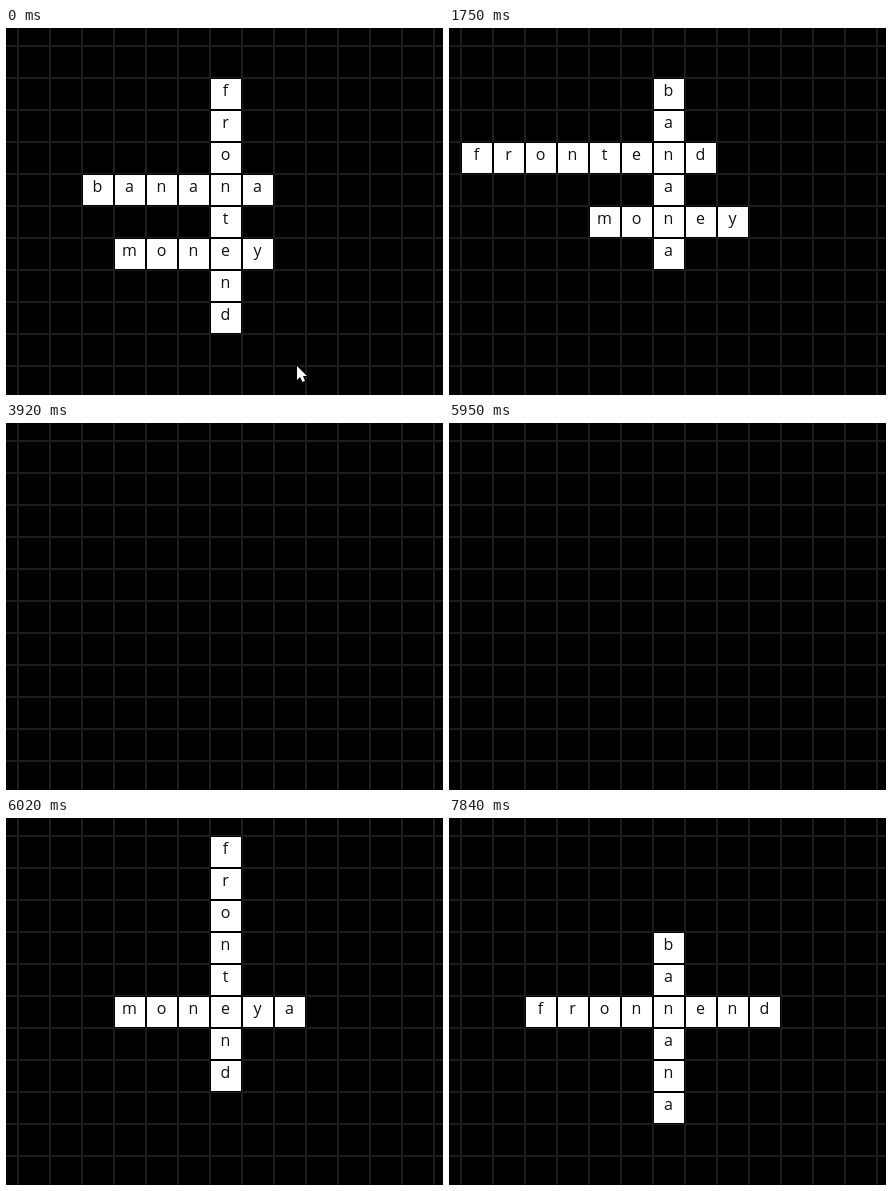
An HTML page for the animation above (8 s loop, 437 px wide and 367 px high).

```html
<!DOCTYPE html>
<html lang="en">
<head>
<meta charset="utf-8">
<title>Crossword layouts</title>
<style>
  html, body { margin: 0; width: 100%; height: 100%; overflow: hidden; background: #000; }
  svg { display: block; }
  text { font: 16px "Open Sans", "Noto Sans", sans-serif; text-anchor: middle; fill: #111; }
  .layout, #cursor { visibility: hidden; }
</style>
</head>
<body>
<svg id="stage" width="437" height="367" viewBox="0 0 437 367">
  <path id="grid" stroke="#1c1c1c" stroke-width="2" fill="none"/>
  <g id="layouts"></g>
  <path id="cursor" d="M291 338V352L294 349L296.5 354L299 353L297 348H301Z"
        fill="#fff" stroke="#000" stroke-width="2" paint-order="stroke"/>
</svg>
<script>
const CELL = 32, LEFT = 12, TOP = 18, LOOP = 8000;

// Each word: text, column, row, runs downward?
const LAYOUTS = {
  tall: [['frontend', 6, 1, true], ['banana', 2, 4], ['money', 3, 6]],
  wide: [['banana', 6, 1, true], ['frontend', 0, 3], ['money', 4, 5]],
  cross: [['frontend', 6, 0, true], ['moneya', 3, 5]],
  low: [['banana', 6, 3, true], ['fronnend', 2, 5]]
};

// Start time in ms and the layout shown from then on; null leaves the grid empty.
const STEPS = [
  [0, 'tall'], [1680, null], [1750, 'wide'], [3920, null], [3990, 'tall'],
  [5950, null], [6020, 'cross'], [7770, null], [7840, 'low']
];
const CURSOR_END = 70;

function add(parent, tag, attrs, content = '') {
  const node = document.createElementNS('http://www.w3.org/2000/svg', tag);
  for (const [key, value] of Object.entries(attrs)) node.setAttribute(key, value);
  node.textContent = content;
  return parent.appendChild(node);
}

function drawCell(parent, letter, column, row) {
  const x = LEFT + column * CELL, y = TOP + row * CELL;
  add(parent, 'rect', { x, y, width: CELL, height: CELL, fill: '#000' });
  add(parent, 'rect', { x: x + 1, y: y + 1, width: CELL - 2, height: CELL - 2, fill: '#fff' });
  add(parent, 'text', { x: x + 15.5, y: y + 18 }, letter);
}

function drawLayout(words) {
  const group = add(document.getElementById('layouts'), 'g', { class: 'layout' });
  const used = new Set();
  for (const [word, column, row, down] of words) {
    [...word].forEach((letter, i) => {
      const c = down ? column : column + i, r = down ? row + i : row;
      const key = c + ',' + r;
      if (!used.has(key)) drawCell(group, letter, c, r);
      used.add(key);
    });
  }
  return group;
}

let lines = '';
for (let x = LEFT; x < 437; x += CELL) lines += `M${x} 0V367`;
for (let y = TOP; y < 367; y += CELL) lines += `M0 ${y}H437`;
document.getElementById('grid').setAttribute('d', lines);

const groups = Object.entries(LAYOUTS).map(([name, words]) => [name, drawLayout(words)]);
const cursor = document.getElementById('cursor');
const show = (node, on) => { node.style.visibility = on ? 'visible' : 'hidden'; };

function render(time) {
  const t = time % LOOP;
  const current = STEPS.filter(([start]) => start <= t).pop()[1];
  for (const [name, group] of groups) show(group, name === current);
  show(cursor, t < CURSOR_END);
}

const origin = performance.now();
function tick() {
  render(performance.now() - origin);
  requestAnimationFrame(tick);
}
tick();
</script>
</body>
</html>
```
